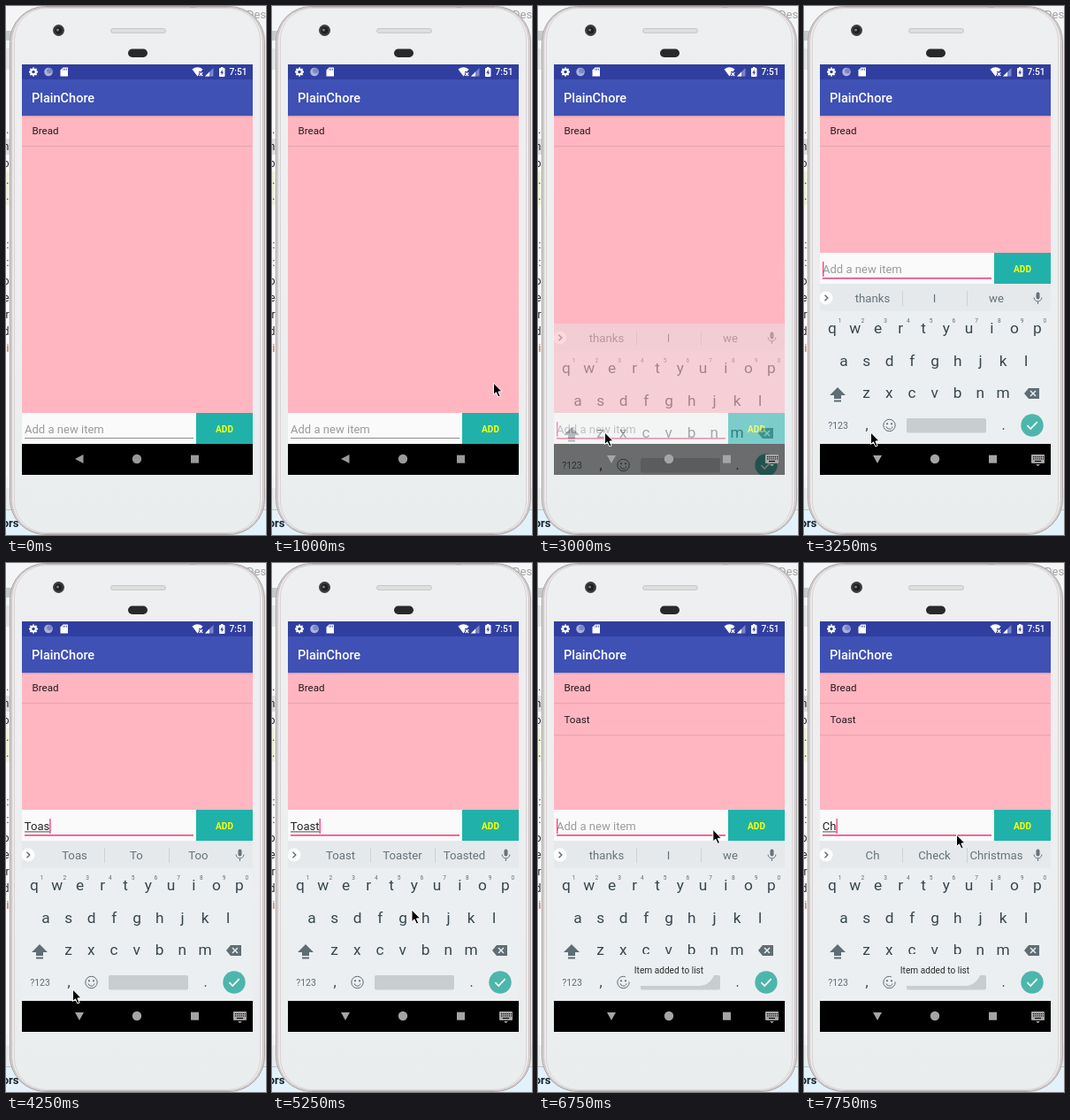
An HTML page with a canvas that plays this animation: 294x598 px, repeating every 8000 ms.

```html
<!DOCTYPE html>
<html lang="en">
<head>
<meta charset="utf-8">
<title>To-do list demo</title>
<style>
html, body { margin: 0; width: 100%; height: 100%; overflow: hidden; background: #f4f5f6; }
canvas { display: block; width: 294px; height: 598px; }
</style>
</head>
<body>
<canvas id="stage"></canvas>
<script>
const W = 294, H = 598, LOOP = 8000, STEP = 250;
const ratio = window.devicePixelRatio || 1;
const stage = setup(document.getElementById('stage'));
const layer = setup(document.createElement('canvas'));
let ctx = stage;

const FONT = 'Roboto, "Open Sans", sans-serif';
const KEYS = ['qwertyuiop', 'asdfghjkl', 'zxcvbnm'];

// Pointer stops: time, x, y of the tip
const POINTER = [
  [750, 296, 400], [1250, 205, 452], [1750, 130, 475], [2250, 117.5, 476],
  [2500, 96, 480], [2750, 75.5, 482], [4750, 75.5, 482], [5250, 158, 392],
  [5750, 248.5, 290], [6250, 248.5, 290], [7000, 172.5, 307], [8000, 172.5, 307]
];

// Entry field text and keyboard suggestions from each time on
const TYPING = [
  [0, '', 'thanks I we'],
  [3500, 'T', 'T The This'],
  [3750, 'To', 'To Too Today'],
  [4000, 'Toa', 'Toa To Too'],
  [4250, 'Toas', 'Toas To Too'],
  [4500, 'Toast', 'Toast Toaster Toasted'],
  [6000, '', 'Toast Toaster Toasted'],
  [6250, '', 'thanks I we'],
  [7500, 'C', 'C Can Call'],
  [7750, 'Ch', 'Ch Check Christmas']
];

function setup(canvas) {
  canvas.width = W * ratio;
  canvas.height = H * ratio;
  const context = canvas.getContext('2d');
  context.scale(ratio, ratio);
  return context;
}

function rect(x, y, w, h, fill) {
  ctx.fillStyle = fill;
  ctx.fillRect(x, y, w, h);
}

function rounded(x, y, w, h, r, fill, stroke) {
  ctx.beginPath();
  ctx.roundRect(x, y, w, h, r);
  paint(fill, stroke);
}

function disc(x, y, r, fill, stroke) {
  ctx.beginPath();
  ctx.arc(x, y, r, 0, Math.PI * 2);
  paint(fill, stroke);
}

function poly(points, fill, stroke) {
  ctx.beginPath();
  for (let i = 0; i < points.length; i += 2) ctx.lineTo(points[i], points[i + 1]);
  ctx.closePath();
  paint(fill, stroke);
}

function line(points, stroke, width = 1) {
  ctx.beginPath();
  for (let i = 0; i < points.length; i += 2) ctx.lineTo(points[i], points[i + 1]);
  ctx.lineWidth = width;
  ctx.strokeStyle = stroke;
  ctx.stroke();
}

function paint(fill, stroke) {
  if (fill) { ctx.fillStyle = fill; ctx.fill(); }
  if (stroke) { ctx.lineWidth = 1; ctx.strokeStyle = stroke; ctx.stroke(); }
}

function fade(y0, y1, from, to) {
  const g = ctx.createLinearGradient(0, y0, 0, y1);
  g.addColorStop(0, from);
  g.addColorStop(1, to);
  return g;
}

function text(str, x, y, size, color, align = 'left', weight = 400) {
  ctx.font = `${weight} ${size}px ${FONT}`;
  ctx.textAlign = align;
  ctx.fillStyle = color;
  ctx.fillText(str, x, y);
}

function drawDesktop() {
  rect(0, 0, W, H, '#f4f5f6');
  rect(0, 28, 8, 11, '#c6cacd');
  rect(0, 48, 8, 24, '#e4e5e6');
  rect(0, 72, 8, 460, '#fafafa');
  rect(0, 150, 8, 18, '#dfdfdf');
  rect(0, 187, 8, 38, '#eef3df');
  rect(0, 545, W, 24, '#e9ebec');
  rect(0, 569, W, 29, '#e3f2fa');
  line([0, 569.5, W, 569.5], '#b9c5cb');
  const scraps = [['.', 144], ['n', 163], ['o', 182], ['.', 201], ['.', 219], [':', 274],
    [':', 294], ['o', 315], ['e', 334], ['r', 353], ['d', 372]];
  for (const [s, y] of scraps) text(s, 3.5, y, 12, '#222', 'right');
  text('i', 3.5, 391, 12, '#a4502c', 'right');
  text('Des', 272, 14, 13, '#a3a3a3');
  text('ors', 14.5, 589, 13, '#15242e', 'right', 700);
}

function drawPhone() {
  rounded(4.5, .5, 288, 597, 40, '#dcd8d9', '#a9a3a5');
  rounded(6.5, 1.5, 284, 595, 38, '#eeeaeb', '#c6bfc1');
  rounded(9.5, 2.5, 278, 593, 36, fade(0, H, '#eeeff0', '#eaedee'), '#d8d4d5');
  rect(208, 0, 7, 2, '#b0abad');
  disc(59.5, 27.5, 6.5, '#3d3d40');
  disc(59.5, 27.5, 4, '#202024');
  disc(58.5, 27, 1.6, '#77777c');
  rounded(118.5, 25.5, 62, 5, 2.5, '#dedede', '#c8c8c8');
  rounded(138, 48.5, 22, 9.5, 4.7, '#29292c');
}

function drawStatusBar() {
  rect(18, 66, 261, 17, '#303f9f');
  for (let i = 0; i < 4; i++) {
    const a = i * Math.PI / 4, dx = Math.cos(a) * 5, dy = Math.sin(a) * 5;
    line([31 - dx, 74.5 - dy, 31 + dx, 74.5 + dy], '#fff', 2);
  }
  disc(31, 74.5, 3.8, '#fff');
  disc(31, 74.5, 1.7, '#303f9f');
  disc(48, 74.5, 4.8, '#a9b1dc');
  disc(49.2, 73.2, 3, '#7c88c5');
  poly([61.5, 72.5, 64.5, 69.5, 70, 69.5, 70, 79.5, 61.5, 79.5], '#fff');
  for (let x = 64.5; x < 69; x += 1.8) rect(x, 70.7, .8, 2, '#303f9f');

  ctx.beginPath();
  ctx.moveTo(216.5, 79.5);
  ctx.lineTo(210.5, 71.5);
  ctx.quadraticCurveTo(216.5, 67, 222.5, 71.5);
  ctx.closePath();
  paint('#fff');
  rect(218, 74, 6, 6, '#303f9f');
  line([218.7, 75.2, 222.2, 79], '#fff', 1.2);
  line([222.2, 75.2, 218.7, 79], '#fff', 1.2);
  poly([225, 79.5, 234.5, 79.5, 234.5, 70], '#7985c7');
  poly([225, 79.5, 230, 79.5, 230, 74.5], '#fff');
  rounded(241, 70, 6.5, 10, 1, '#fff');
  rect(243, 69, 2.5, 2, '#fff');
  poly([244.8, 71.5, 242.3, 75.7, 244, 75.7, 243.6, 78.5, 246.1, 74.4, 244.5, 74.4], '#303f9f');
  text('7:51', 272.5, 78.3, 10.2, '#fff', 'right', 500);
}

function drawApp(items) {
  rect(18, 124, 261, 371, '#ffb6c1');
  rect(18, 124, 261, 2.5, fade(124, 126.5, 'rgba(60,50,60,.2)', 'rgba(60,50,60,0)'));
  rect(18, 83, 261, 41, '#3f51b5');
  text('PlainChore', 29, 109, 14.5, '#fff', 'left', 500);
  drawStatusBar();
  items.forEach((item, i) => {
    const y = 145 + i * 35.7;
    text(item, 29.5, y, 11.6, '#26191c');
    rect(18, Math.round(y + 13), 261, 1, '#e3a5af');
  });
}

function drawEntry(top, value, focused) {
  rect(18, top, 197, 35, '#fafafa');
  rect(215, top, 64, 35, '#20b2aa');
  text('ADD', 247, top + 21.5, 10.1, '#ff0', 'center', 700);
  const base = top + 23;
  if (value) {
    text(value, 20.8, base, 13.05, '#242424');
    rect(21, base + 1.5, ctx.measureText(value).width, .8, '#242424');
  } else {
    text('Add a new item', 21, base, 13.05, '#9b9b9b');
  }
  if (focused) {
    rect(21, top + 28, 191, 1.6, '#ee4580');
    const x = value ? 20.8 + ctx.measureText(value).width : 21;
    rect(x, top + 10, 1.4, 17, '#ff4081');
  } else {
    rect(21, top + 28, 191, 1, '#8d8d8d');
  }
}

function drawNav(open) {
  const grey = open ? '#a5a5a5' : '#999';
  if (open) {
    poly([78, 508, 88, 508, 83, 517], grey);
    rounded(257, 507, 15, 10, 1, grey);
    for (let x = 259; x < 270; x += 2.2) {
      rect(x, 509, 1.2, 1.2, '#111');
      rect(x, 511.4, 1.2, 1.2, '#111');
    }
    rect(261, 514, 7, 1.2, '#111');
    poly([262, 518, 267, 518, 264.5, 520.3], grey);
  } else {
    poly([78, 512, 87.5, 507, 87.5, 517], grey);
  }
  disc(148, 512, 5.2, grey);
  rect(209, 507.7, 9, 9, grey);
}

function drawSuggestions(words) {
  rect(18, 314, 261, 31, '#e5e9eb');
  disc(25, 330, 7.5, '#fff');
  line([23.5, 326.8, 26.8, 330, 23.5, 333.2], '#5f6d74', 1.4);
  words.forEach((w, i) => text(w, 77.5 + i * 70, 335, 13.2, '#66737a', 'center'));
  rect(111, 322, 1, 17, '#ccd2d5');
  rect(184, 322, 1, 17, '#ccd2d5');
  rounded(262.5, 323.5, 4, 8, 2, '#66737a');
  ctx.beginPath();
  ctx.arc(264.5, 329.5, 4.4, 0, Math.PI);
  paint(null, '#66737a');
  rect(264, 334, 1, 3, '#66737a');
}

function drawKeyboard(words) {
  const ink = '#37474f', soft = '#5f6d74';
  rect(18, 314, 261, 216, '#eceff1');
  drawSuggestions(words);
  KEYS.forEach((row, r) => {
    const left = [32, 45, 70.5][r];
    [...row].forEach((key, i) => {
      const x = left + i * 25.75, y = 370 + r * 36.5;
      text(key, x, y, 17.3, ink, 'center');
      if (r === 0) text(String((i + 1) % 10), x + 8.5, 357.5, 6.6, soft, 'center');
    });
  });

  poly([38, 431, 47, 440, 42, 440, 42, 444, 34, 444, 34, 440, 29, 440], soft);
  rect(34, 445.5, 8, 2, soft);
  poly([249, 438, 254, 432, 266, 432, 266, 444, 254, 444], soft);
  line([256, 435, 262, 441], '#eceff1', 1.4);
  line([262, 435, 256, 441], '#eceff1', 1.4);

  text('?123', 38.5, 478, 10.5, soft, 'center');
  text(',', 71, 479, 16, ink, 'center');
  disc(96.5, 474, 6.7, null, soft);
  disc(94, 472.3, 1.1, soft);
  disc(99, 472.3, 1.1, soft);
  ctx.beginPath();
  ctx.arc(96.5, 474.5, 3.6, .25, Math.PI - .25);
  paint(null, soft);
  rounded(116, 466, 90, 16.5, 2, '#c8cdcf');
  text('.', 225.5, 479, 16, ink, 'center');
  disc(258, 474, 12.7, '#4db6ac');
  line([252.5, 474.2, 256.2, 478, 263.7, 470.2], '#fff', 1.7);
}

// The keyboard is blended as one sheet while it slides in
function drawRisingKeyboard(words) {
  ctx = layer;
  drawKeyboard(words);
  ctx = stage;
  ctx.globalAlpha = .45;
  ctx.drawImage(layer.canvas, 0, 45, W, H);
  ctx.globalAlpha = 1;
}

function drawMessage() {
  rounded(97, 442, 103, 36, 18, '#eceff1');
  text('Item added to list', 148, 464, 10.15, '#2b2b2b', 'center');
}

function drawPointer(t) {
  const next = POINTER.findIndex(p => p[0] > t);
  if (next < 1) return;
  const [t0, x0, y0] = POINTER[next - 1], [t1, x1, y1] = POINTER[next];
  const k = (t - t0) / (t1 - t0);
  ctx.save();
  ctx.translate(x0 + (x1 - x0) * k, y0 + (y1 - y0) * k);
  poly([0, 0, 0, 13.5, 3, 10.8, 5.4, 16, 7.7, 15, 5.4, 10, 9.5, 9.7], '#000', '#fff');
  ctx.restore();
}

function render(now) {
  const t = Math.floor(now % LOOP / STEP) * STEP;
  const [, value, list] = TYPING.filter(s => s[0] <= t).pop();
  const words = list.split(' ');
  const open = t >= 3250, rising = t === 3000;

  drawDesktop();
  drawPhone();
  ctx.save();
  ctx.beginPath();
  ctx.rect(18, 66, 261, 464);
  ctx.clip();
  drawApp(t >= 6000 ? ['Bread', 'Toast'] : ['Bread']);
  drawEntry(open ? 279 : 460, value, t >= 2750);
  if (open) drawKeyboard(words);
  rect(18, 495, 261, 35, '#000');
  if (rising) drawRisingKeyboard(words);
  drawNav(open || rising);
  if (t >= 6250) drawMessage();
  ctx.restore();
  drawPointer(t);
}

const start = performance.now();
function tick() {
  render(performance.now() - start);
  requestAnimationFrame(tick);
}
tick();
</script>
</body>
</html>
```
